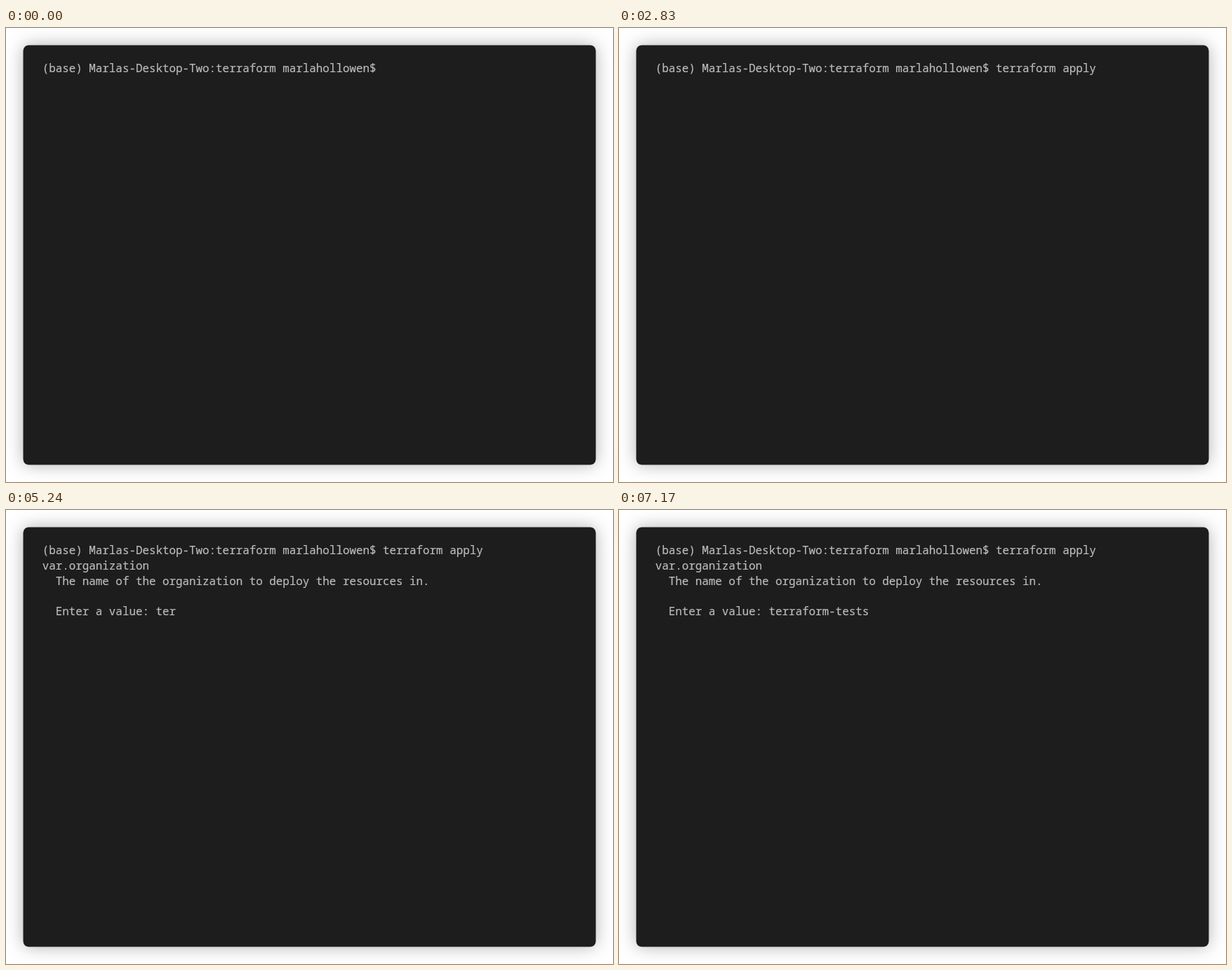
Write an HTML page that moves like this. It is 865 px wide and 647 px high and loops after 8 s.

```html
<!DOCTYPE html>
<html lang="en">
<head>
<meta charset="utf-8">
<title>Terminal</title>
<style>
  html, body {
    margin: 0;
    width: 100%;
    height: 100%;
    overflow: hidden;
    background: #fff;
  }
  svg {
    position: absolute;
    left: 0;
    top: 0;
    filter: drop-shadow(0 0 12px rgba(0, 0, 0, .3));
  }
  pre {
    position: absolute;
    left: 51.7px;
    top: 47.4px;
    margin: 0;
    color: #bababa;
    font: 15.87px/21.75px "Noto Sans Mono", monospace;
    font-variant-ligatures: none;
    -webkit-text-stroke: .2px #bababa;
  }
</style>
</head>
<body>
<svg width="865" height="647">
  <rect x="24.5" y="24.5" width="816" height="598" rx="8" fill="#1d1d1d"/>
</svg>
<pre id="screen"></pre>
<script>
  const LOOP = 8000;
  const screen = document.getElementById("screen");

  // Text arrives in bursts: start and time per character in ms (0 = all at once).
  const bursts = [
    [0, 0, "(base) Marlas-Desktop-Two:terraform marlahollowen$ "],
    [550, 215, "ter"],
    [1120, 97, "rafo"],
    [1550, 115, "rm ap"],
    [2220, 200, "pl"],
    [2830, 0, "y"],
    [3950, 0, "\nvar.organization\n  The name of the organization to deploy the resources in.\n"],
    [4060, 0, "\n  Enter a value: "],
    [4880, 180, "ter"],
    [5400, 103, "rafo"],
    [5850, 90, "rm"],
    [6160, 135, "-te"],
    [6720, 225, "sts"]
  ];

  function typed(t, [start, gap, text]) {
    if (t < start) return "";
    return gap ? text.slice(0, 1 + Math.floor((t - start) / gap)) : text;
  }

  function draw(t) {
    const text = bursts.map(burst => typed(t, burst)).join("");
    if (screen.textContent !== text) screen.textContent = text;
  }

  const begin = performance.now();
  function tick() {
    draw((performance.now() - begin) % LOOP);
    requestAnimationFrame(tick);
  }
  tick();
</script>
</body>
</html>
```
